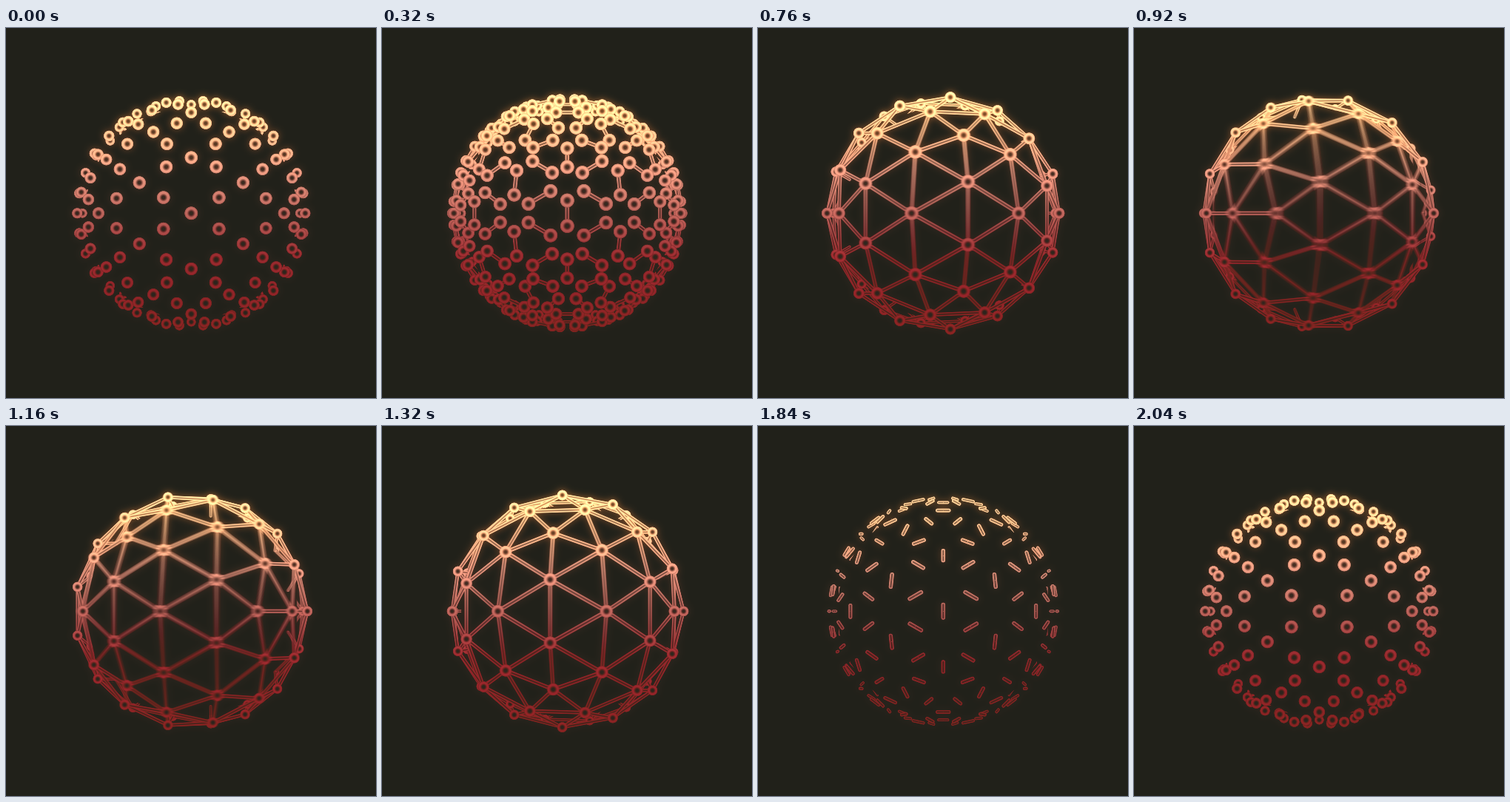
An HTML page with a canvas that plays this animation: 500 by 500 pixels, repeating every 2.12 s.

```html
<!DOCTYPE html>
<html lang="en">
<head>
<meta charset="utf-8">
<title>Geodesic sphere</title>
<style>
  html, body { margin: 0; width: 100%; height: 100%; overflow: hidden; background: #21211a; }
  canvas { display: block; width: 500px; height: 500px; }
</style>
</head>
<body>
<canvas id="stage" width="500" height="500"></canvas>
<script>
const SIZE = 500, MID = 250.3, RADIUS = 150, CAMERA = 500;
const LOOP = 2120, STEP = 40, SHUTTER = 10;
const TURN_MID = 1024, TURN_TIME = 1310;
const BACKGROUND = '#21211a';

const makeLayer = (size = SIZE) => {
  const c = document.createElement('canvas');
  c.width = c.height = size;
  return c.getContext('2d');
};
const stage = document.getElementById('stage').getContext('2d');
const scene = makeLayer(), blend = makeLayer(), glow = makeLayer();

const clamp = x => Math.min(1, Math.max(0, x));
const mix = (a, b, k) => a + (b - a) * k;
const span = (t, from, to) => clamp((t - from) / (to - from));
const ease = (x, p) => x < .5 ? .5 * (2 * x) ** p : 1 - .5 * (2 - 2 * x) ** p;
const mixPoint = (a, b, k) => a.map((v, i) => mix(v, b[i], k));

// Icosahedron with every edge cut in three, pushed out to the sphere
function buildSphere() {
  const phi = (1 + Math.sqrt(5)) / 2, corners = [];
  for (const a of [1, -1]) for (const b of [phi, -phi])
    corners.push([0, a, b], [b, 0, a], [a, b, 0]);
  const gap = (p, q) => Math.hypot(p[0] - q[0], p[1] - q[1], p[2] - q[2]);
  const near = (p, q) => gap(p, q) < 2.1;
  const found = new Map();
  corners.forEach((a, ia) => corners.forEach((b, ib) => corners.forEach((c, ic) => {
    if (ia >= ib || ib >= ic || !near(a, b) || !near(b, c) || !near(a, c)) return;
    for (let i = 0; i <= 3; i++) for (let j = 0; i + j <= 3; j++) {
      const p = a.map((v, n) => v * i + b[n] * j + c[n] * (3 - i - j));
      const len = Math.hypot(...p);
      const unit = p.map(v => v / len);
      found.set(unit.map(v => Math.round(v * 1000) + 0).join(), unit);
    }
  })));
  const units = [...found.values()], edges = [];
  units.forEach((p, i) => {
    for (let j = i + 1; j < units.length; j++)
      if (gap(p, units[j]) < .5) edges.push([i, j]);
  });
  return { nodes: units.map(p => p.map(v => v * RADIUS)), edges };
}
const { nodes, edges } = buildSphere();

function makeBall() {
  const c = makeLayer(64);
  const g = c.createRadialGradient(32, 32, 0, 32, 32, 32);
  const stops = [[0, 15], [.2, 40], [.4, 135], [.58, 240], [.78, 250], [.93, 190]];
  for (const [at, v] of stops) g.addColorStop(at, `rgb(${v},${v},${v})`);
  g.addColorStop(1, 'rgba(150,150,150,0)');
  c.fillStyle = g;
  c.fillRect(0, 0, 64, 64);
  return c.canvas;
}
const ball = makeBall();

function verticalGradient(stops) {
  const g = stage.createLinearGradient(0, 85, 0, 415);
  stops.forEach(([at, color]) => g.addColorStop(at, color));
  return g;
}
const tint = verticalGradient([
  [0, '#ffe2ae'], [.14, '#ffcf9e'], [.32, '#e8a088'],
  [.5, '#b8645c'], [.68, '#98292e'], [1, '#861a21']
]);
const halo = verticalGradient([
  [0, '#ff8428'], [.16, '#c0561e'], [.36, '#4e1e12'], [.6, '#260c0a'], [1, '#180606']
]);

const turn = t =>
  Math.PI * ease(clamp((t - TURN_MID) / TURN_TIME + .5), 4.4);

function pose(t) {
  const opening = t < 600, closing = t > 1480;
  const reach = opening ? ease(span(t, 100, 580), 2.5)
    : 1 - ease(span(t, 1480, 2010), 2);
  const settled = mix(7.7, 6.6, span(t, 600, 900));
  return {
    reach, opening, closing,
    endBall: mix(6.7, 7.7, span(t, 120, 600)),
    nodeBall: mix(settled, 1.3, span(t, 1440, 1640)) * (1 - span(t, 1640, 1760)),
    midBall: 6.7 * ease(span(t, 1800, 2040), 2)
  };
}

function project([x, y, z], cos, sin) {
  const depth = z * cos - x * sin, scale = CAMERA / (CAMERA - depth);
  return { x: MID + (x * cos + z * sin) * scale, y: MID - y * scale, z: depth, scale };
}

function drawStrut({ a, b, width }) {
  for (const [part, color] of [[1, '#e4e4e4'], [.34, '#6c6c6c']]) {
    scene.strokeStyle = color;
    scene.lineWidth = width * part;
    scene.beginPath();
    scene.moveTo(a.x, a.y);
    scene.lineTo(b.x, b.y);
    scene.stroke();
  }
}

function drawItems(items) {
  items.sort((m, n) => m.order - n.order);
  for (const item of items) {
    if (item.q) {
      const { q, r } = item;
      scene.drawImage(ball, q.x - r, q.y - r, 2 * r, 2 * r);
    } else drawStrut(item);
  }
}

function drawScene(state, angle) {
  const cos = Math.cos(angle), sin = Math.sin(angle);
  const back = [], front = [];
  const add = (z, item) => {
    if (z > -90) (z < -15 ? back : front).push(item);
  };
  // balls are lifted so that they cover the struts ending in them
  const addBall = (p, r) => {
    const q = project(p, cos, sin);
    if (r > .1) add(q.z, { order: q.z + 30, q, r: r * q.scale });
  };
  for (const [i, j] of edges) {
    const p = nodes[i], q = nodes[j], s = state.reach / 2;
    const start = mixPoint(p, q, .5 - s), end = mixPoint(p, q, .5 + s);
    const a = project(start, cos, sin), b = project(end, cos, sin);
    const z = (a.z + b.z) / 2;
    if (s > .004) add(z, { order: z, a, b, width: 2.1 * (a.scale + b.scale) });
    if (state.opening && state.reach < 1) {
      addBall(start, state.endBall);
      if (s > 0) addBall(end, state.endBall);
    }
    if (state.closing) addBall(mixPoint(p, q, .5), state.midBall);
  }
  if (state.reach === 1 || state.closing) nodes.forEach(p => addBall(p, state.nodeBall));

  scene.fillStyle = '#000';
  scene.fillRect(0, 0, SIZE, SIZE);
  scene.lineCap = 'round';
  drawItems(back);
  // a dark core hides the far side
  scene.fillStyle = '#000';
  scene.beginPath();
  scene.arc(MID, MID, 143, 0, 2 * Math.PI);
  scene.fill();
  drawItems(front);
}

function paint(layer, mode, alpha, source) {
  layer.globalCompositeOperation = mode;
  layer.globalAlpha = alpha;
  if (source instanceof HTMLCanvasElement) layer.drawImage(source, 0, 0);
  else {
    layer.fillStyle = source;
    layer.fillRect(0, 0, SIZE, SIZE);
  }
}

function render(t) {
  const state = pose(t);
  const sweep = turn(t + SHUTTER / 2) - turn(t - SHUTTER / 2);
  const samples = sweep < .002 ? 1 : 10;

  paint(blend, 'source-over', 1, '#000');
  for (let i = 0; i < samples; i++) {
    drawScene(state, turn(t + SHUTTER * ((i + .5) / samples - .5)));
    paint(blend, 'lighter', 1 / samples, scene.canvas);
  }

  paint(glow, 'source-over', 1, '#000');
  glow.filter = 'blur(5px)';
  paint(glow, 'source-over', 1, blend.canvas);
  glow.filter = 'none';
  paint(glow, 'multiply', 1, halo);
  paint(blend, 'multiply', 1, tint);

  paint(stage, 'source-over', 1, BACKGROUND);
  paint(stage, 'lighten', 1, blend.canvas);
  paint(stage, 'lighter', .6, glow.canvas);
}

let shown = -1;
function tick() {
  const now = performance.now() % LOOP;
  const t = now < 120 || now >= 2040 ? 0 : Math.floor(now / STEP) * STEP;
  if (t !== shown) render(shown = t);
  requestAnimationFrame(tick);
}
tick();
</script>
</body>
</html>
```
